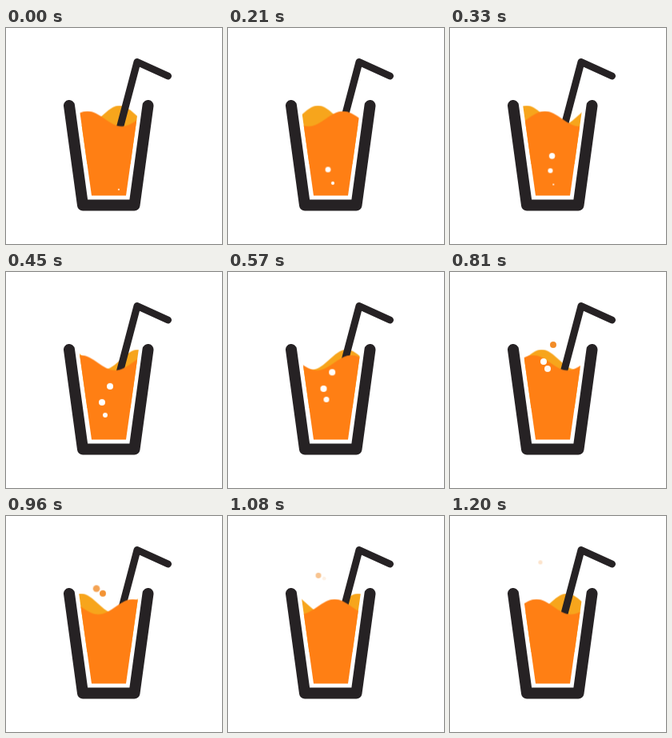
Recreate the animation shown at these times as an HTML page without scripts. Size 270 px wide and 270 px high, loop 1230 ms.

```html
<!DOCTYPE html>
<html lang="en">
<head>
<meta charset="utf-8">
<title>Fizzy orange drink</title>
<style>
  :root { --loop: 1230ms; --ink: #262224; --juice: #ff7f14; --amber: #f7a51c; --drop: #f28c28; }
  html, body { margin: 0; width: 100%; height: 100%; overflow: hidden; background: #fff; }
  svg { display: block; width: 100%; height: 100%; }

  .line { fill: none; stroke: var(--ink); stroke-linecap: round; stroke-linejoin: round; }
  .glass { stroke-width: 14; }
  .straw { stroke-width: 9; }

  .front { fill: var(--juice); animation: front-wave var(--loop) linear infinite; }
  .back { fill: var(--amber); animation: back-wave var(--loop) linear infinite; }
  /* One wavelength is 86 units, so both waves loop without a seam */
  @keyframes front-wave {
    from { transform: translate(102px, 113.5px); }
    to { transform: translate(-156px, 113.5px); }
  }
  @keyframes back-wave {
    from { transform: translate(142px, 109.5px); }
    to { transform: translate(-30px, 109.5px); }
  }

  .bubble { fill: #fff; animation: var(--loop) linear infinite; }
  .first { animation-name: first; }
  .second { animation-name: second; }
  .third { animation-name: third; }

  /* Bubbles turn orange as they leave the surface, then shrink and fade */
  @keyframes first {
    0% { transform: translate(141px, 202px) scale(.25); }
    17.1% { transform: translate(125px, 177px) scale(.85); }
    36.6% { transform: translate(130px, 143px) scale(1); }
    60% { transform: translate(130.5px, 101px) scale(1); fill: #fff; }
    60.1% { fill: var(--drop); }
    65.9% { transform: translate(129px, 91px) scale(1); fill: var(--drop); opacity: 1; }
    77%, 100% { transform: translate(127px, 72px) scale(.5); fill: var(--drop); opacity: 0; }
  }
  @keyframes second {
    0%, 10% { transform: translate(137px, 204px) scale(0); }
    17.1% { transform: translate(131px, 194px) scale(.52); }
    36.6% { transform: translate(120px, 163px) scale(1); }
    56.1% { transform: translate(119px, 129px) scale(1); }
    65.9% { transform: translate(117px, 112px) scale(1); }
    72% { fill: #fff; }
    72.1% { fill: var(--drop); opacity: 1; }
    78% { transform: translate(113px, 91px) scale(1.08); opacity: .8; }
    97.6% { transform: translate(113px, 58px) scale(.65); opacity: .24; }
    100% { transform: translate(113px, 54px) scale(.6); fill: var(--drop); opacity: .15; }
  }
  @keyframes third {
    0%, 22% { transform: translate(132px, 204px) scale(0); }
    36.6% { transform: translate(124px, 179px) scale(.75); }
    56.1% { transform: translate(122px, 140px) scale(1); }
    65.9% { transform: translate(122px, 121px) scale(1); }
    74.5% { fill: #fff; }
    74.6% { fill: var(--drop); }
    78% { transform: translate(121px, 97px) scale(1); opacity: .95; }
    89.5%, 100% { transform: translate(120px, 75px) scale(.5); fill: var(--drop); opacity: 0; }
  }
</style>
</head>
<body>
<svg viewBox="0 0 270 270">
  <defs>
    <clipPath id="inside"><path d="M89.5 85L107 209.5H150L167.5 85Z"/></clipPath>
    <!-- Crest-to-crest periods, starting on a crest at x = -86 -->
    <path id="front-shape" d="M-86-9.5c15.7 0 27.3 19 43 19s27.3-19 43-19 27.3 19 43 19 27.3-19 43-19 27.3 19 43 19 27.3-19 43-19 27.3 19 43 19 27.3-19 43-19 27.3 19 43 19 27.3-19 43-19V110H-86Z"/>
    <path id="back-shape" d="M-86-12.5c15.7 0 27.3 25 43 25s27.3-25 43-25 27.3 25 43 25 27.3-25 43-25 27.3 25 43 25 27.3-25 43-25 27.3 25 43 25 27.3-25 43-25V60H-86Z"/>
  </defs>

  <g clip-path="url(#inside)"><use class="back" href="#back-shape"/></g>
  <path class="line straw" d="M141.7 127L164 42.5L202.5 60"/>
  <g clip-path="url(#inside)"><use class="front" href="#front-shape"/></g>

  <circle class="bubble first" r="4"/>
  <circle class="bubble second" r="4"/>
  <circle class="bubble third" r="4"/>

  <path class="line glass" d="M79 97L96 221.5H160.5L177.5 97"/>
</svg>
</body>
</html>
```
